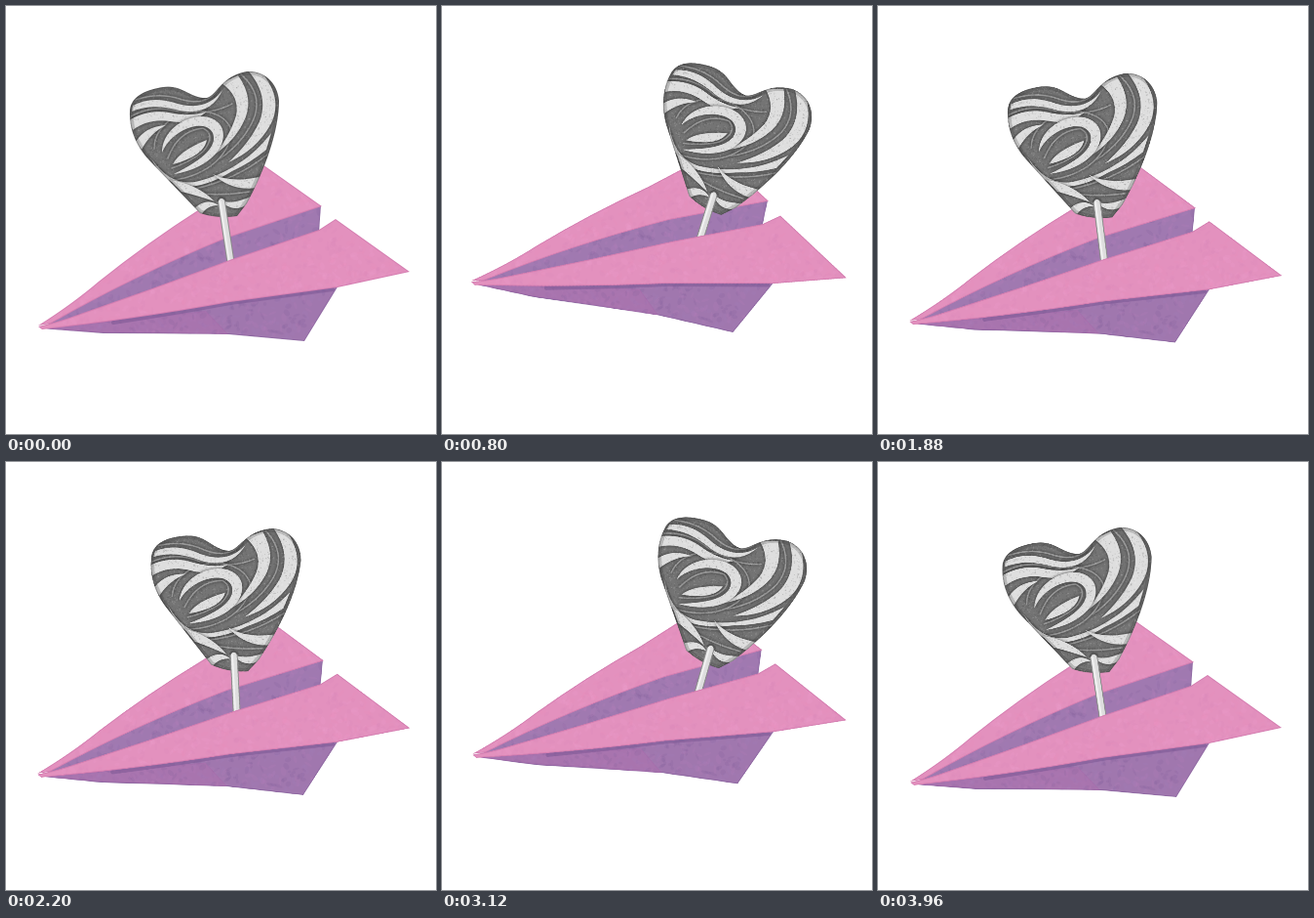
Animation of 441x438 px, one loop 4 s. Source, as an HTML page with a canvas:

```html
<!DOCTYPE html>
<html lang="en">
<head>
<meta charset="utf-8">
<title>Paper plane and lollipop</title>
<style>
html, body { margin: 0; width: 100%; height: 100%; overflow: hidden; background: #fff; }
canvas { display: block; }
</style>
</head>
<body>
<canvas id="stage" width="441" height="438"></canvas>
<script>
const W = 441, H = 438, LOOP = 4000, STEP = 40, SCALE = 2;
const ctx = document.getElementById('stage').getContext('2d');

let seed = 7;
function random() {
  seed = (seed * 16807) % 2147483647;
  return seed / 2147483647;
}

function layer(paint) {
  const canvas = document.createElement('canvas');
  canvas.width = W * SCALE;
  canvas.height = H * SCALE;
  const g = canvas.getContext('2d');
  g.scale(SCALE, SCALE);
  g.lineCap = g.lineJoin = 'round';
  paint(g);
  return canvas;
}

function stroke(g, path, color, width) {
  g.strokeStyle = color;
  g.lineWidth = width;
  g.stroke(path);
}

// Soft random spots inside the current clip
function spots(g, box, count, size, colors) {
  const [x, y, w, h] = box;
  for (let i = 0; i < count; i++) {
    g.fillStyle = colors[i % colors.length];
    g.beginPath();
    g.ellipse(x + random() * w, y + random() * h, size * (0.4 + random()),
      size * (0.3 + random() * 0.5), random() * 3, 0, 7);
    g.fill();
  }
}

function paper(g, outline, color, tints, edge) {
  const path = new Path2D(outline);
  g.save();
  g.clip(path);
  g.fillStyle = color;
  g.fill(path);
  spots(g, [30, 160, 390, 185], 2200, 3.5, tints);
  stroke(g, path, edge, 2);
  g.restore();
}

const pinkTints = ['rgba(240,165,205,.13)', 'rgba(205,125,180,.11)', 'rgba(236,140,185,.11)'];
const purpleTints = ['rgba(185,125,185,.15)', 'rgba(120,90,150,.15)', 'rgba(160,125,185,.13)'];
const pinkEdge = 'rgba(200,110,165,.5)', purpleEdge = 'rgba(125,90,150,.45)';

const back = layer(g => {
  paper(g, 'M40 328 L130 270 L225 225 L323 204 L321 232 L232 264 L120 305Z',
    '#a079b0', purpleTints, purpleEdge);
  paper(g, 'M33 327 Q68 305 95 282 Q145 242 200 207 L263 162 L324 205 L225 238 Q130 277 46 325Z',
    '#e391be', pinkTints, pinkEdge);
});

const front = layer(g => {
  paper(g, 'M35 330 Q140 318 230 300 L341 286 L306 343 L228 336 Q150 335 100 335Z',
    '#a077ae', purpleTints, purpleEdge);
  paper(g, 'M37 330 Q130 320 205 312 L228 336 Q140 334 95 334Z',
    'rgba(174,116,176,.6)', purpleTints, 'rgba(160,100,165,.3)');
  stroke(g, new Path2D('M110 324 Q170 315 230 304 L335 290'), 'rgba(120,85,145,.5)', 4);
  paper(g, 'M33 328 Q50 324 62 320 L150 289 L232 259 L321 229 L338 218 L414 272 L340 288 L230 303 Q130 321 37 331Z',
    '#e391be', pinkTints, pinkEdge);
});

const HEART = 'M127 107 C128 91 147 85 161 83 C181 80 189 95 206 94 C217 91 220 72 247 67 ' +
  'C268 66 279 82 280 97 C280 127 266 167 247 202 L237 215 Q217 218 199 212 ' +
  'L150 161 C135 146 126 128 127 107Z';
const STRIPES = [
  'M221 79 L238 71 Q256 96 243 120 Q234 138 214 152 Q230 132 236 112 Q240 92 221 79Z',
  'M249 67 L263 69 Q285 96 271 122 Q256 148 228 160 Q250 140 260 118 Q270 92 249 67Z',
  'M130 102 Q150 91 176 100 Q206 108 222 86 Q210 113 178 107 Q150 99 129 108Z',
  'M126 117 Q148 104 172 110 Q190 113 206 108 Q190 122 168 118 Q146 115 130 127Z',
  'M133 139 Q143 123 164 122 Q148 130 139 147Z',
  'M160 150 C160 116 212 100 222 126 C228 148 202 168 172 172 C196 160 218 146 212 130 C204 114 170 126 160 150Z',
  'M171 162 Q178 148 206 137 Q204 148 190 155 Q180 160 171 162Z',
  'M149 156 Q168 184 194 180 Q220 174 240 160 Q256 150 272 130 L267 147 Q250 161 232 169 Q206 185 184 185 Q162 182 149 156Z',
  'M212 172 Q232 182 263 174 L257 186 Q232 190 212 172Z',
  'M168 178 Q196 182 214 200 Q196 194 180 190Z',
  'M220 199 Q232 204 253 194 L246 204 Q232 212 220 199Z',
  'M192 208 Q206 195 218 204 Q206 204 200 214Z'
];
const FOLDS = [
  'M241 70 Q266 92 252 120 Q242 140 220 156',
  'M133 96 Q156 88 178 95 Q206 104 218 84',
  'M128 113 Q150 101 174 107 Q208 113 232 100',
  'M152 146 C152 108 214 94 230 124 C234 150 206 174 172 178',
  'M166 156 Q176 128 202 125 Q216 132 202 149 Q188 160 170 166',
  'M138 146 Q160 186 190 188 Q236 178 268 152',
  'M184 189 Q210 196 250 190'
];

const candy = layer(g => {
  const heart = new Path2D(HEART);
  g.save();
  g.clip(heart);
  g.fillStyle = '#747474';
  g.fill(heart);
  g.shadowColor = 'rgba(25,25,25,.8)';
  g.shadowBlur = 6;
  FOLDS.forEach(d => stroke(g, new Path2D(d), '#979797', 1.5));
  g.fillStyle = '#dedede';
  STRIPES.forEach(d => g.fill(new Path2D(d)));
  g.shadowColor = 'transparent';
  stroke(g, heart, 'rgba(45,45,45,.22)', 7);
  stroke(g, heart, 'rgba(50,50,50,.3)', 2);
  spots(g, [125, 65, 156, 152], 4500, 0.8, ['rgba(40,40,40,.16)', 'rgba(255,255,255,.14)']);
  g.restore();

  const stick = new Path2D('M221 200 L232 272');
  stroke(g, stick, '#8b8b8b', 8);
  stroke(g, stick, '#dedede', 6);
  stroke(g, new Path2D('M219.5 200 L230.5 272'), '#efefef', 2);
  stroke(g, new Path2D('M217 199 Q220 193 225 198'), '#555', 2);
});

// time, plane height, plane tilt, candy tilt, candy height
const POSES = [
  [0, 300, 0, 0, 199],
  [560, 288, 5.2, 17.5, 190],
  [800, 280.3, 7.8, 26, 192.5],
  [1080, 280, 8.5, 28.5, 192],
  [1440, 287, 6.5, 21.5, 194],
  [1880, 299.5, 1.36, 1.6, 200],
  [1980, 300.3, 1, 0.6, 200.3],
  [2240, 295, 1.4, 7, 196],
  [2480, 287.5, 2.27, 17.5, 191],
  [2860, 281, 3.2, 26, 189],
  [3120, 282, 3.1, 24.6, 190],
  [3400, 288, 2, 17, 190.5]
];

function poseAt(i) {
  const n = POSES.length, turn = Math.floor(i / n);
  const [time, ...values] = POSES[i - turn * n];
  return [time + turn * LOOP, ...values];
}

// Monotone cubic interpolation, flat at every extreme
function valueAt(t, column) {
  let i = POSES.length - 1;
  while (POSES[i][0] > t) i--;
  const rise = k => {
    const a = poseAt(k), b = poseAt(k + 1);
    return (b[column] - a[column]) / (b[0] - a[0]);
  };
  const slope = k => {
    const a = rise(k - 1), b = rise(k);
    return a * b > 0 ? 2 * a * b / (a + b) : 0;
  };
  const a = poseAt(i), b = poseAt(i + 1), span = b[0] - a[0], u = (t - a[0]) / span;
  const ease = u * u * (3 - 2 * u);
  return a[column] + (b[column] - a[column]) * ease +
    span * u * (1 - u) * (slope(i) * (1 - u) - slope(i + 1) * u);
}

function place(image, pivotX, pivotY, x, y, degrees) {
  ctx.save();
  ctx.translate(x, y);
  ctx.rotate(degrees * Math.PI / 180);
  ctx.drawImage(image, -pivotX, -pivotY, W, H);
  ctx.restore();
}

function draw(t) {
  const [planeY, planeTilt, candyTilt, candyY] = [1, 2, 3, 4].map(c => valueAt(t, c));
  const planeX = 224 - planeTilt * 0.13;
  ctx.fillStyle = '#fff';
  ctx.fillRect(0, 0, W, H);
  place(back, 224, 300, planeX, planeY, planeTilt);
  place(candy, 221, 199, 221 + 2.23 * candyTilt, candyY, candyTilt);
  place(front, 224, 300, planeX, planeY, planeTilt);
}

const start = performance.now();
function tick() {
  const elapsed = (performance.now() - start) % LOOP;
  draw(Math.floor(elapsed / STEP) * STEP);
  requestAnimationFrame(tick);
}
tick();
</script>
</body>
</html>
```
